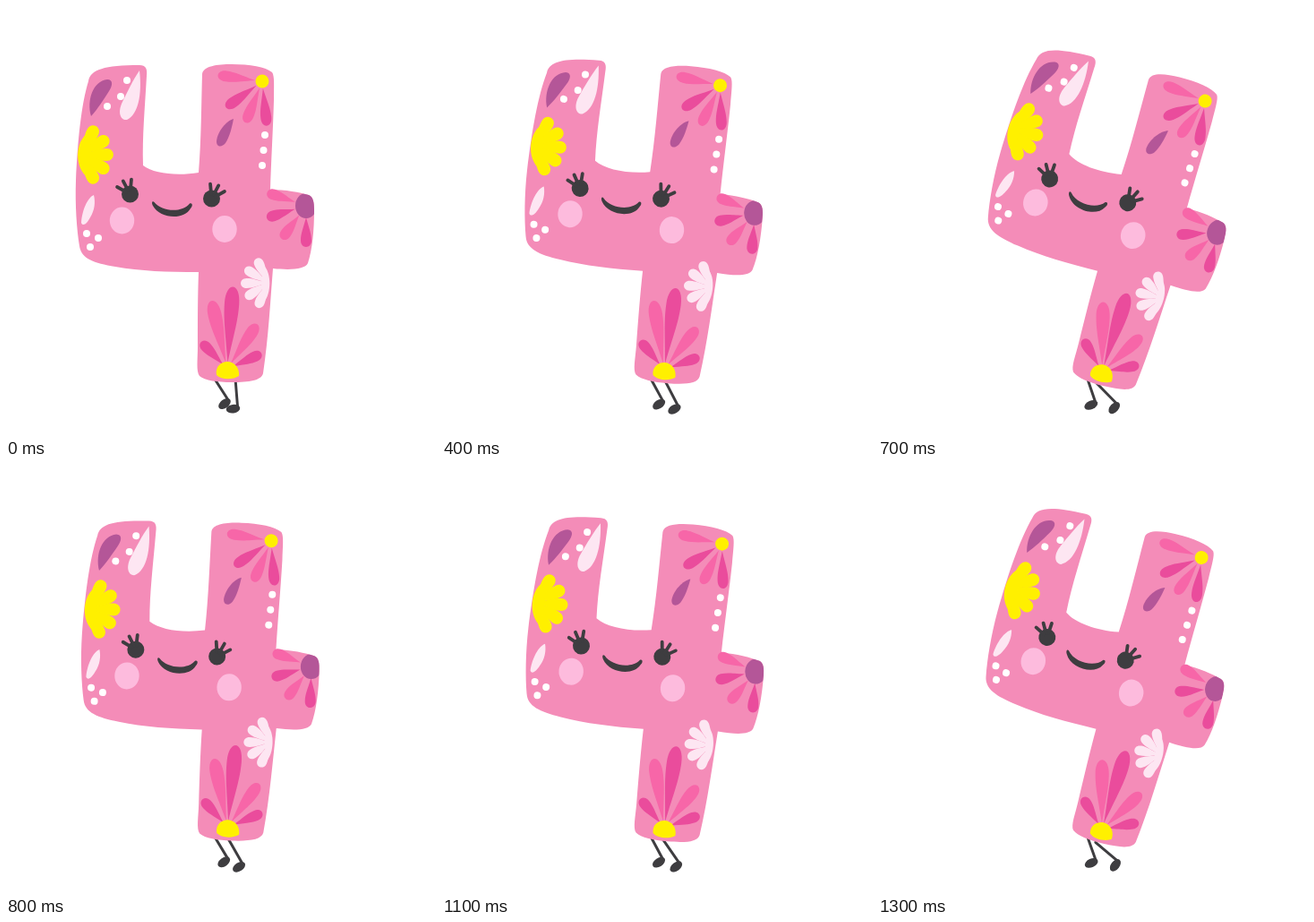
An HTML page for the animation above (1.4 s loop, 480 by 480 pixels).

```html
<!DOCTYPE html>
<html lang="en">
<head>
<meta charset="utf-8">
<title>Dancing four</title>
<style>
  html, body { margin: 0; width: 100%; height: 100%; overflow: hidden; background: #fff; }
  svg { display: block; width: 100%; height: 100%; }
  .dark { fill: #3e3d40; }
  .line { fill: none; stroke: #3e3d40; stroke-width: 3; stroke-linecap: round; }
  .lash { stroke-width: 3.8; }
  .body { fill: #f48cb8; }
  .hot { fill: #ea4c9c; }
  .mid { fill: #f766a8; }
  .plum { fill: #b45698; }
  .pale { fill: #fde6f2; }
  .sun { fill: #fff000; }
  .cheek { fill: #fdbbdd; }
  .white { fill: #fff; }
</style>
</head>
<body>
<svg viewBox="0 0 480 480">
  <defs>
    <path id="shape" d="M92 84C94 71 110 66 149 66C156 66 158 70 157 78C155 115 152 145 153 178C165 187 190 190 215 186C218 150 218 110 219 76C220 67 236 65 252 65C272 65 290 68 297 74C300 78 299 90 299 105C298 140 296 172 295 205C312 205 328 208 338 211C343 213 344 219 344 228C344 250 342 272 337 287C334 294 318 295 298 293C295 330 293 370 287 410C285 418 272 420 252 420C236 420 222 418 216 413C212 408 214 395 214 380C214 350 214 325 215 297C180 297 150 296 122 291C98 287 84 282 82 268C79 250 77 222 78 195C80 150 84 110 92 84Z"/>
    <clipPath id="clip"><use href="#shape"/></clipPath>
  </defs>

  <g id="leg">
    <path class="line" d="M256 416L258.500 447"/>
    <ellipse class="dark" cx="253.5" cy="449.7" rx="7.8" ry="4.8" transform="rotate(-8 253.5 449.7)"/>
  </g>

  <g id="four">
    <path class="line" d="M234 418L247.500 439"/>
    <ellipse class="dark" cx="244" cy="444" rx="7.8" ry="4.8" transform="rotate(-38 244 444)"/>
    <use href="#shape" class="body"/>

    <g id="petals"></g>
    <path class="plum" d="M95 123C90 105 97 84 113 82C120 82 119 89 115 95C108 106 103 114 95 123Z"/>
    <path class="pale" d="M149 72C142 82 135 97 130 107C124 119 128 128 135 127C148 121 152 98 149 72Z"/>
    <path class="plum" d="M254 126C246 128 236 140 235 151C235 158 241 158 245 153C250 145 252 136 254 126Z"/>
    <path class="pale" d="M98 211C91 214 85 228 84 242C86 247 91 242 94 236C99 228 100 219 98 211Z"/>
    <path class="sun" d="M93 141C76 150 76 182 92 192L94 166Z"/>
    <path class="pale" d="M287 289C297 297 296 322 288 330L285 309Z"/>
    <path class="sun" d="M235 412C233 402 241 397 247 397C255 397 261 404 260 413C254 417 241 418 235 412Z"/>
    <circle class="sun" cx="286" cy="84" r="7.5"/>
    <ellipse class="plum" cx="335" cy="223" rx="12" ry="14" clip-path="url(#clip)"/>
    <g id="dots"></g>

    <g id="face">
      <path class="dark" d="M165.500 219C174 230 197 231 205 220.500C208 219 209 223 206 226C199 239 172 238 164 223C162 219.500 163.500 217 165.500 219Z"/>
    </g>
  </g>
</svg>

<script>
const NS = 'http://www.w3.org/2000/svg';
const byId = id => document.getElementById(id);
const rad = deg => deg * Math.PI / 180;

function add(parent, tag, attrs) {
  const el = document.createElementNS(NS, tag);
  for (const key in attrs) el.setAttribute(key, attrs[key]);
  byId(parent).append(el);
}

// Teardrop pointing away from (x, y), from radius r to radius end, w wide.
function petal(cls, x, y, angle, r, end, w) {
  const l = end - r, h = w / 2;
  const a = l * .4, b = l * .55, c = l * .78, e = l * 1.07;
  add('petals', 'path', {
    class: cls,
    transform: `translate(${x} ${y}) rotate(${angle}) translate(${r} 0)`,
    d: `M0 0C${a} ${-h * .6} ${b} ${-h} ${c} ${-h}C${e} ${-h} ${e} ${h} ${c} ${h}C${b} ${h} ${a} ${h * .6} 0 0Z`
  });
}

// Evenly spread petals from angle a to b; colours alternate.
function fan(colors, n, x, y, a, b, r, end, w) {
  for (let i = 0; i < n; i++) {
    petal(colors[i % colors.length], x, y, a + (b - a) * i / (n - 1), r, end, w);
  }
}

fan(['sun'], 5, 84, 166, -63, 63, 0, 36, 14);
fan(['pale'], 5, 292, 309, 112, 246, 0, 30, 11);
fan(['mid', 'hot'], 4, 335, 223, 199, 90, 13, 46, 12);

const top4 = [188, 144, 112, 84];
top4.forEach((a, i) => petal(i % 2 ? 'hot' : 'mid', 286, 84, a, 8, 50, 12));

const bouquet = [[226, 42], [257, 78], [274, 92], [304, 60], [336, 42]];
bouquet.forEach(([a, end], i) =>
  petal(i % 2 ? 'mid' : 'hot', 247, 405, a, 7, end, 8 + end / 11));

const dot = (cx, cy) => add('dots', 'circle', { class: 'white', cx, cy, r: 4 });
for (let i = 0; i < 3; i++) dot(289 - 1.5 * i, 144 + 17 * i);
[[135, 83], [128, 101], [113, 112], [90, 254], [103, 259], [94, 269]].forEach(p => dot(...p));

// side is -1 for the left eye and 1 for the right.
function eye(cx, cy, side) {
  add('face', 'circle', { class: 'dark', cx, cy, r: 9.5 });
  for (let i = 0; i < 3; i++) {
    const a = rad(33 * i - 5), dx = side * Math.sin(a), dy = -Math.cos(a);
    add('face', 'path', {
      class: 'line lash',
      d: `M${cx + dx * 5} ${cy + dy * 5}L${cx + dx * 16.5} ${cy + dy * 16.5}`
    });
  }
}
eye(138.5, 210, -1);
eye(229.5, 215, 1);

const cheek = (cx, cy) => add('face', 'ellipse', { class: 'cheek', cx, cy, rx: 13.7, ry: 15 });
cheek(129.5, 239.5);
cheek(244, 249);

// A slow drift, then a quick eased swing; ms is the time since the snap back.
function lean(ms) {
  const drift = Math.min(ms / 440, 1);
  const swing = Math.max(0, (ms - 440) / 260);
  return 4.57 * drift ** .85 + 9.33 * Math.sin(swing * Math.PI / 2) ** 1.2;
}

// The second lean starts a little ahead and with the leg already out.
function draw(now) {
  const t = Math.floor(now % 1400 / 100) * 100;
  const second = t > 700;
  const tilt = lean(second ? t - 660 : t);
  const kick = second ? 22 + 1.75 * tilt : t * .057;
  byId('four').setAttribute('transform', `rotate(${tilt} 235 419.5)`);
  byId('leg').setAttribute('transform', `rotate(${-kick} 257 435)`);
}

const start = performance.now();
function tick() {
  draw(performance.now() - start);
  requestAnimationFrame(tick);
}
tick();
</script>
</body>
</html>
```
